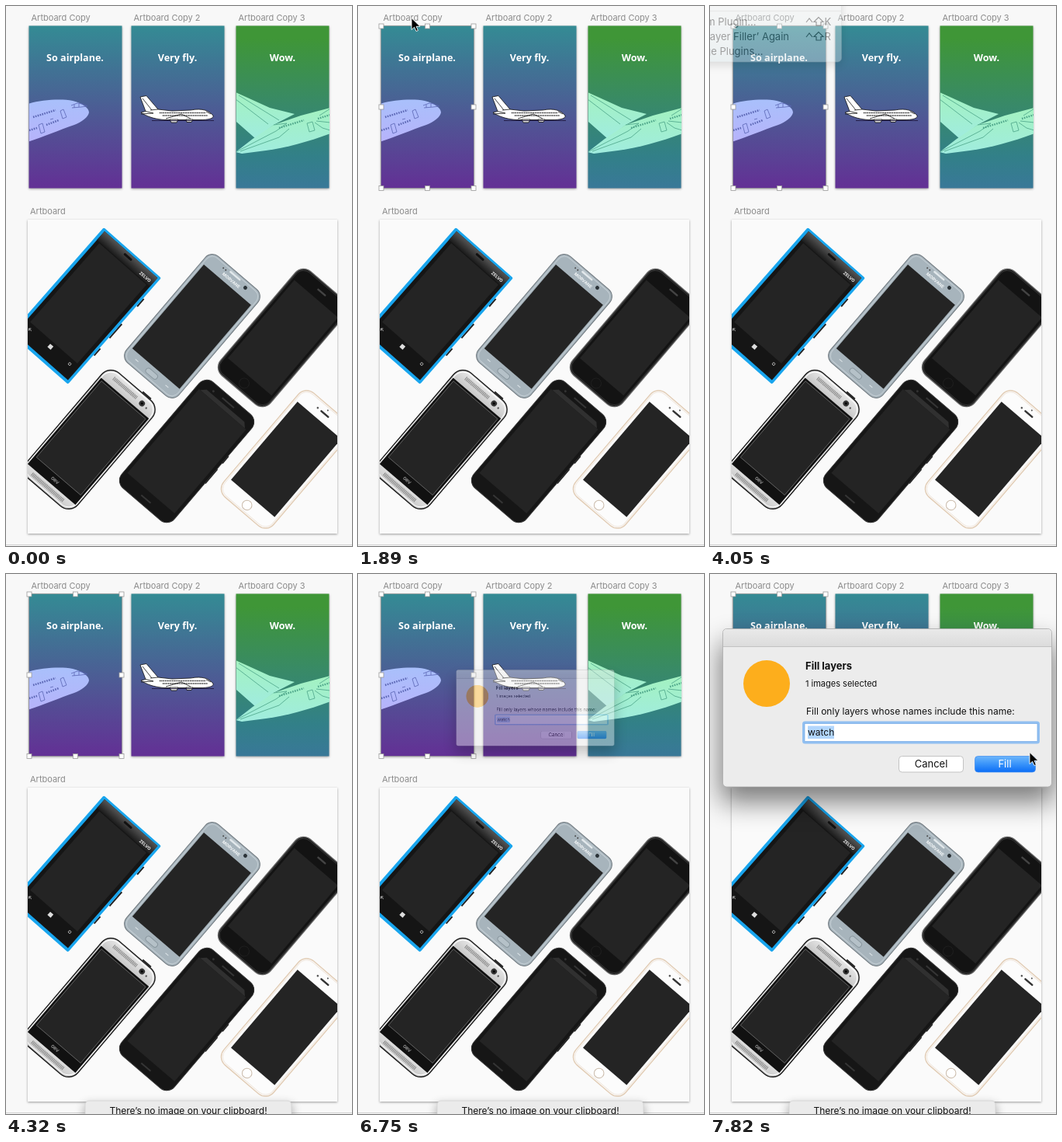
Animation, 446 px wide and 695 px high, one loop 8000 ms. Source, as an HTML page:

```html
<!DOCTYPE html>
<html lang="en">
<head>
<meta charset="utf-8">
<title>Fill layers</title>
<style>
html, body { margin: 0; width: 100%; height: 100%; overflow: hidden; background: #f8f8f8; }
svg { display: block; width: 100%; height: 100%; font-family: Inter, "Noto Sans", sans-serif; }
.label { font-size: 11px; fill: #8b8b8b; }
.title { font: 700 12.6px "Open Sans", sans-serif; fill: #fff; text-anchor: middle; }
.brand { font-size: 5.5px; font-weight: 700; text-anchor: middle; }
.mid { text-anchor: middle; }
.end { text-anchor: end; }
.screen { fill: #242424; }
.line { fill: none; }
.cursor, .selection, .menu, .toast, .dialog { animation: 8s step-end infinite; }
.cursor { animation-name: cursor; }
.selection { animation-name: selection; }
.menu { animation-name: menu; }
.toast { animation-name: toast; }
.dialog { animation-name: dialog; transform-origin: 228.5px 172.3px; }
@keyframes cursor {
  0% { opacity: 0; transform: translate(72px, 0); }
  6.75% { opacity: 1; transform: translate(72px, 0); }
  10.125% { opacity: 1; transform: translate(71px, 15px); }
  23.625% { opacity: 1; transform: translate(69px, 15px); }
  30.375% { opacity: 0; transform: translate(69px, 15px); }
  87.75% { opacity: 1; transform: translate(388px, 376px); }
  91.125%, 100% { opacity: 1; transform: translate(412px, 229px); }
}
@keyframes selection {
  0% { opacity: 0; }
  13.5%, 100% { opacity: 1; }
}
@keyframes menu {
  0% { opacity: 0; }
  30.375% { opacity: 1; }
  50.625% { opacity: .4; }
  54%, 100% { opacity: 0; }
}
@keyframes toast {
  0% { opacity: 0; }
  54%, 100% { opacity: 1; }
}
@keyframes dialog {
  0% { opacity: 0; transform: scale(.48); }
  84.375% { opacity: .42; transform: scale(.48); }
  87.75%, 100% { opacity: 1; transform: none; }
}
</style>
</head>
<body>
<svg viewBox="0 0 446 695">
  <defs>
    <linearGradient id="dusk" x2="0" y2="1">
      <stop stop-color="#348b94"/><stop offset="1" stop-color="#633095"/>
    </linearGradient>
    <linearGradient id="forest" x2="0" y2="1">
      <stop offset=".08" stop-color="#3f9637"/><stop offset=".5" stop-color="#38896a"/>
      <stop offset=".8" stop-color="#328088"/><stop offset="1" stop-color="#397898"/>
    </linearGradient>
    <linearGradient id="mint" x2="0" y2="1">
      <stop stop-color="#a3f2c0"/><stop offset="1" stop-color="#a0ecdf"/>
    </linearGradient>
    <linearGradient id="sky" x2="0" y2="1">
      <stop stop-color="#a9c0fb"/><stop offset="1" stop-color="#b7b3fb"/>
    </linearGradient>
    <linearGradient id="gloss" x2="0" y2="1">
      <stop stop-color="#555"/><stop offset="1" stop-color="#1b1b1b"/>
    </linearGradient>
    <linearGradient id="steel" x2="0" y2="1">
      <stop stop-color="#e9e9e9"/><stop offset=".15" stop-color="#bcbcbc"/>
      <stop offset=".85" stop-color="#f2f2f2"/><stop offset="1" stop-color="#c9c9c9"/>
    </linearGradient>
    <linearGradient id="glass" x2="0" y2="1">
      <stop stop-color="#f5f5f5"/><stop offset=".4" stop-color="#edf2f3"/><stop offset="1" stop-color="#d9e6ea"/>
    </linearGradient>
    <linearGradient id="bar" x2="0" y2="1">
      <stop stop-color="#e9e9e9"/><stop offset="1" stop-color="#dcdcdc"/>
    </linearGradient>
    <linearGradient id="blue" x2="0" y2="1">
      <stop stop-color="#6db6fb"/><stop offset=".45" stop-color="#3d97fa"/><stop offset="1" stop-color="#0b6df6"/>
    </linearGradient>
    <filter id="soft" x="-20%" y="-20%" width="140%" height="150%"><feGaussianBlur stdDeviation="1.5"/></filter>
    <filter id="haze" x="-30%" y="-50%" width="160%" height="200%"><feGaussianBlur stdDeviation="6"/></filter>
    <filter id="deep" x="-30%" y="-50%" width="160%" height="200%"><feGaussianBlur stdDeviation="17"/></filter>
    <clipPath id="page"><rect x="28" y="275" width="399" height="404"/></clipPath>
    <clipPath id="left"><rect x="30" y="26" width="119" height="208"/></clipPath>
    <clipPath id="right"><rect x="297" y="26" width="120" height="208"/></clipPath>
    <rect id="board" width="120" height="209"/>
    <rect id="knob" x="-3" y="-3" width="6" height="6" fill="#fff" stroke="#999" stroke-width=".8"/>
    <g id="ctrlShift" class="line" stroke="#222" stroke-width="1.2">
      <path d="M124 -4 128 -9 132 -4"/>
      <path d="M140 -10.5 134 -4.500H137V0H143V-4.500H146Z"/>
    </g>
  </defs>

  <rect width="446" height="695" fill="#f8f8f8"/>
  <path d="M0 693.500H446" stroke="#d2d2d2"/>

  <!-- artboards -->
  <g class="label">
    <text x="32.500" y="19">Artboard Copy</text>
    <text x="164.500" y="19">Artboard Copy 2</text>
    <text x="299.500" y="19">Artboard Copy 3</text>
    <text x="31" y="268">Artboard</text>
  </g>
  <g fill="#000" opacity=".38" filter="url(#soft)">
    <use href="#board" x="29.500" y="26.500"/>
    <use href="#board" x="161.500" y="26.500"/>
    <use href="#board" x="296.500" y="26.500"/>
    <rect x="28" y="276" width="399" height="404"/>
  </g>
  <use href="#board" x="29.500" y="25.500" fill="url(#dusk)"/>
  <use href="#board" x="161.500" y="25.500" fill="url(#dusk)"/>
  <use href="#board" x="296.500" y="25.500" fill="url(#forest)"/>
  <rect x="28" y="275" width="399" height="404" fill="#fafafa"/>

  <g clip-path="url(#left)" stroke="#5b66b4" stroke-width=".8">
    <path d="M28 126C44 121 70 119 86 122C98 125 107 131 107 137C106 143 98 149 88 153C68 160 46 169 28 175Z" fill="url(#sky)" stroke="none"/>
    <path class="line" d="M84 128 92 125 98 126 105 129M85 131 97 130 104 129M88 127V131M94 126V130"/>
    <path class="line" d="M70 135 74 133 78 143 73 145ZM42 153 47 151 50 162 45 164ZM57 146 61 145"/>
    <path class="line" d="M35 143 64 134" stroke-width="2.500" stroke-dasharray="1.600 1.400"/>
    <path class="line" d="M30 160 40 157M52 153 68 147" stroke-width="2.500" stroke-dasharray="1.600 1.400"/>
  </g>

  <g stroke="#111" stroke-width=".8" stroke-linejoin="round">
    <path d="M173 117 181 115.500 196 133 214 135 238 134C254 131 262 135 267 141C268 145 261 146.500 250 146.500H205C194 146 184 143 177 139L174 137 180 135.500Z" fill="#fff"/>
    <path class="line" d="M176 119 188 134M180 135.500 190 138 174 139M196 133 186 134"/>
    <path class="line" d="M198 137.500H257M202 141H260" stroke-width="1.300" stroke-dasharray="1.300 1"/>
    <path class="line" d="M206 145 226 139 238 145M258 136 264 139"/>
    <path d="M211 146H222L220 150H213ZM232 146H241L239 149.500H233Z" fill="#ddd"/>
    <path class="line" d="M188 147.500H268" stroke="#1b1238"/>
  </g>

  <g clip-path="url(#right)" stroke="#4ca488" stroke-width=".8">
    <path d="M296 111 340 131 372 139 345 153 322 171 296 148Z" fill="url(#mint)" stroke="none"/>
    <path d="M296 188 318 171 345 153 380 141 418 131V164C392 174 362 182 335 186L304 190Z" fill="url(#mint)" stroke="none"/>
    <path class="line" d="M296 120 338 152M300 115 352 147M296 188 348 161 362 151 345 153M302 187 352 169 365 158"/>
    <path class="line" d="M388 151 395 149 398 160 391 162ZM404 141 418 132M398 150 408 157 418 160M400 148 418 150"/>
    <path class="line" d="M352 157 384 147M402 145 418 140" stroke-width="2.400" stroke-dasharray="1.600 1.400"/>
  </g>

  <g class="title">
    <text x="89" y="71">So airplane.</text>
    <text x="221" y="71">Very fly.</text>
    <text x="356.500" y="71">Wow.</text>
  </g>

  <!-- phones -->
  <g clip-path="url(#page)">
    <g transform="translate(126 285) rotate(41.3)">
      <path d="M99.500 35V48M99.500 78V102M99.500 120V132" stroke="#222" stroke-width="2"/>
      <rect width="98.500" height="182" rx="2" fill="#18a5ee"/>
      <rect x="4" y="3" width="91" height="175" fill="#151515"/>
      <rect x="4" y="3" width="91" height="15" fill="url(#gloss)"/>
      <rect class="screen" x="9" y="19" width="81" height="135"/>
      <rect x="42" y="6.500" width="13" height="3" rx="1" fill="#111"/>
      <text class="brand" x="82" y="14.500" fill="#eee">ZELVO</text>
      <rect x="47" y="158" width="5.500" height="5.500" fill="#ddd"/>
      <path class="line" d="M18 161.500H13.500M15.500 159.500 13.500 161.500 15.500 163.500" stroke="#ccc" stroke-width=".8"/>
      <circle class="line" cx="83" cy="161" r="1.700" stroke="#ccc" stroke-width=".8"/>
    </g>

    <g transform="translate(240 412) rotate(40.5)">
      <rect x="-44.500" y="-90" width="89" height="180" rx="12" fill="#a7b4bc" stroke="#6d767c"/>
      <rect x="-42" y="-87.500" width="84" height="175" rx="10" class="line" stroke="#c3cdd3"/>
      <rect class="screen" x="-40" y="-70" width="80" height="142"/>
      <rect x="-9" y="-86.500" width="18" height="2.500" rx="1" fill="#e2e8eb"/>
      <text class="brand" y="-75.500" fill="#f4f7f8">MORVANE</text>
      <circle cx="20" cy="-82" r="2.500" fill="#2b3338"/>
      <circle cx="-18" cy="-83" r="1" fill="#444"/><circle cx="-14" cy="-83" r="1" fill="#444"/>
      <rect x="-9" y="77" width="18" height="7" rx="3.500" fill="#b5c1c8" stroke="#8a979f"/>
      <path d="M-28 80H-23M23 80H28" stroke="#dde4e8"/>
    </g>

    <g transform="translate(357 427) rotate(40.5)">
      <rect x="-42.200" y="-88" width="84.400" height="176" rx="14" fill="#131313" stroke="#686868" stroke-width="1.400"/>
      <rect x="-40.500" y="-86" width="81" height="172" rx="12.500" class="line" stroke="#333"/>
      <rect class="screen" x="-37" y="-66" width="74" height="132"/>
      <rect x="-7" y="-78" width="14" height="2.500" rx="1.200" fill="#444"/>
      <circle cy="77" r="6.500" class="line" stroke="#1f1f1f"/>
    </g>

    <g transform="translate(108 558) rotate(40.5)">
      <path d="M12 -91H26" stroke="#222" stroke-width="2"/>
      <rect x="-42.800" y="-89.500" width="85.600" height="179" rx="16" fill="url(#steel)" stroke="#1c1c1c" stroke-width="1.400"/>
      <rect x="-40.500" y="-87" width="81" height="174" rx="14" class="line" stroke="#fff"/>
      <rect x="-40.500" y="-70" width="81" height="146" fill="#111"/>
      <rect class="screen" x="-37.500" y="-67" width="75" height="129" stroke="#8a8a8a" stroke-width=".6"/>
      <path d="M-28 -80H11M-28 82H26" stroke="#8f8f8f" stroke-width="5" stroke-dasharray="1.200 .8"/>
      <circle cx="21" cy="-79" r="3.800" fill="#333"/><circle cx="21" cy="-79" r="1.500" fill="#000"/>
      <circle cx="29" cy="-78" r="1.200" fill="#555"/>
      <text class="brand" y="71" fill="#999">ORV</text>
    </g>

    <g transform="translate(233 573) rotate(40.5)">
      <path d="M45 -30V-18M45 -8V16" stroke="#222" stroke-width="2"/>
      <rect x="-44.500" y="-89.500" width="89" height="179" rx="13" fill="#161616" stroke="#303030"/>
      <path d="M-32 -77H32L38 -71H-38Z" fill="#303030"/>
      <rect class="screen" x="-40" y="-71" width="80" height="142"/>
      <path d="M-10 -82H10M-8 81H8" stroke="#353535" stroke-width="2"/>
      <circle cx="-24" cy="-81" r="1.500" fill="#333"/>
    </g>

    <g transform="translate(361 583.500) rotate(40.5)">
      <rect x="-42.200" y="-88" width="84.400" height="176" rx="14" fill="#fcfcfc" stroke="#e2cdb6" stroke-width="1.500"/>
      <rect x="-40.300" y="-86" width="80.600" height="172" rx="12.500" class="line" stroke="#f1e8df"/>
      <rect class="screen" x="-37" y="-66" width="74" height="132"/>
      <rect x="-7" y="-78" width="14" height="2.500" rx="1.200" fill="#333"/>
      <circle cy="-83" r="1" fill="#555"/><circle cx="-12" cy="-77" r="1.300" fill="#555"/>
      <circle cy="77.500" r="6.300" fill="#fff" stroke="#c9b9a8"/>
    </g>
  </g>

  <g class="selection">
    <rect x="29.500" y="25.500" width="120" height="209" class="line" stroke="#999" stroke-width=".7"/>
    <use href="#knob" x="30" y="26"/><use href="#knob" x="89.500" y="26"/><use href="#knob" x="149" y="26"/>
    <use href="#knob" x="30" y="130"/><use href="#knob" x="149" y="130"/>
    <use href="#knob" x="30" y="234.500"/><use href="#knob" x="89.500" y="234.500"/><use href="#knob" x="149" y="234.500"/>
  </g>

  <g class="menu">
    <rect x="-20" y="-20" width="190" height="97" rx="5" opacity=".28" filter="url(#haze)"/>
    <rect x="-20" y="-20" width="189.500" height="92" rx="5" fill="url(#glass)" stroke="#bbb" stroke-width=".6"/>
    <path d="M0 6.500H169" stroke="#d4d6d7" stroke-width="1.500"/>
    <g font-size="13" fill="#1c1c1c">
      <text class="end" x="59.500" y="25">Run Custom Plugin…</text>
      <text class="end" x="102" y="44">Run ‘Layer Filler’ Again</text>
      <text class="end" x="68.500" y="63">Manage Plugins…</text>
      <text x="147.500" y="25">K</text>
      <text x="147.500" y="44">R</text>
    </g>
    <use href="#ctrlShift" y="25"/>
    <use href="#ctrlShift" y="44"/>
  </g>

  <g class="toast">
    <rect x="100" y="681" width="270" height="30" rx="6" opacity=".25" filter="url(#haze)"/>
    <rect x="102" y="678" width="266" height="40" rx="5" fill="#ebebeb" stroke="#cfcfcf" stroke-width=".7"/>
    <text class="mid" x="235" y="695" font-size="12" fill="#111">There’s no image on your clipboard!</text>
  </g>

  <g class="dialog">
    <rect x="13" y="88" width="431" height="206" rx="8" opacity=".5" filter="url(#deep)"/>
    <rect x="16.500" y="70.500" width="424" height="203.500" rx="5" fill="#ececec" stroke="#aaa" stroke-width=".8"/>
    <path d="M17 93V76Q17 71 22 71H435Q440 71 440 76V93Z" fill="url(#bar)"/>
    <path d="M17 93.500H440" stroke="#c2c2c2"/>
    <circle cx="73" cy="141" r="30" fill="#fdae1c"/>
    <g fill="#111">
      <text x="123" y="123" font-size="13" font-weight="700">Fill layers</text>
      <text x="123" y="145" font-size="11">1 images selected</text>
      <text x="124" y="181" font-size="12">Fill only layers whose names include this name:</text>
      <rect x="119" y="189.500" width="306" height="29" rx="3.500" fill="#92c0f1"/>
      <rect x="122" y="192.500" width="300" height="23" fill="#fff" stroke="#72a9e6" stroke-width=".7"/>
      <rect x="126" y="195.500" width="34" height="16.500" fill="#b2d6fd"/>
      <text x="126" y="208" font-size="12">watch</text>
      <rect x="243.500" y="234.500" width="83" height="20.500" rx="4" fill="#fff" stroke="#c3c3c3"/>
      <text class="mid" x="285" y="249.300" font-size="13">Cancel</text>
    </g>
    <rect x="341.500" y="234.500" width="78" height="20.500" rx="4" fill="url(#blue)" stroke="#3c8af0" stroke-width=".7"/>
    <text class="mid" x="380" y="249.300" font-size="13" fill="#fff">Fill</text>
  </g>

  <path class="cursor" d="M0 .5V15.500L3.600 12.200 6 17.500 8.400 16.500 6.100 11.300H11Z" fill="#000" stroke="#fff" stroke-width=".9"/>
</svg>
</body>
</html>
```
